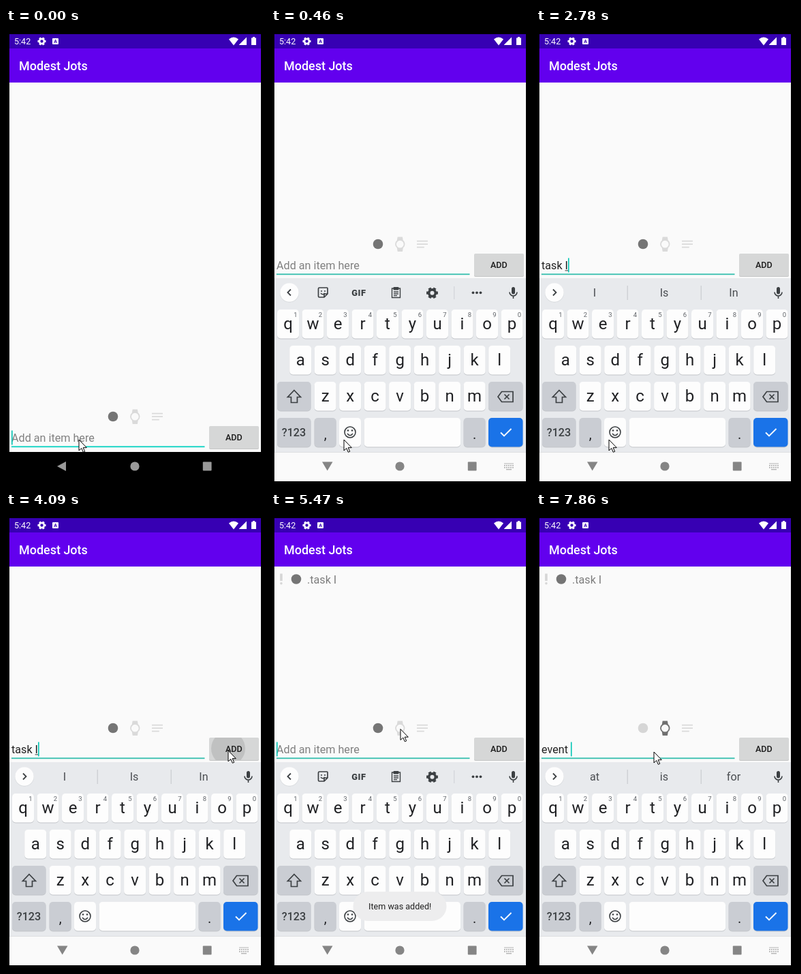
Write an HTML page that moves like this. It is 380 by 669 pixels and loops after 7.99 s.

```html
<!DOCTYPE html>
<html lang="en">
<head>
<meta charset="utf-8">
<title>Modest Jots</title>
<style>
html, body { margin: 0; width: 100%; height: 100%; overflow: hidden; background: #000; }
svg { display: block; width: 380px; height: 669px; }
text { font-family: Roboto, Arial, sans-serif; white-space: pre; }
</style>
</head>
<body>
<svg id="stage" viewBox="0 0 380 669"></svg>
<script>
const LOOP = 7990, FIELD = 16.16, KEYBOARD_SHIFT = 253;

// SVG helpers
const el = (tag, attrs, inner = '') =>
  `<${tag} ${Object.entries(attrs).map(([k, v]) => `${k}="${v}"`).join(' ')}>${inner}</${tag}>`;
const rect = (x, y, width, height, fill, rx = 0) => el('rect', { x, y, width, height, fill, rx });
const dot = (cx, cy, r, fill) => el('circle', { cx, cy, r, fill });
const fillPath = (d, fill, more) => el('path', { d, fill, ...more });
const line = (d, stroke, w = 1.7, more) => el('path', { d, fill: 'none', stroke, 'stroke-width': w, ...more });
const text = (str, x, y, size, fill, more) => el('text', { x, y, 'font-size': size, fill, ...more }, str);
const mid = { 'text-anchor': 'middle' }, bold = { 'font-weight': 500 };
const group = (id, inner, more) => el('g', { id, ...more }, inner);

function gear(x, y, r, color) {
  const ring = (rad, w, more) => el('circle', { cx: x, cy: y, r: rad, fill: 'none', stroke: color, 'stroke-width': w, ...more });
  return ring(r * .58, r * .44) + ring(r * .86, r * .3, { pathLength: 12, 'stroke-dasharray': '1.1 .9', 'stroke-dashoffset': .55 });
}

function statusBar() {
  return rect(5, 9, 369, 21, '#3700b3') + rect(5, 30, 369, 50, '#6200ee') +
    text('5:42', 12, 24, 12.57, '#fff') + gear(52.5, 19.5, 6, '#fff') +
    rect(68, 15, 9, 9, '#fff', 1) + text('A', 72.5, 22.2, 7, '#3700b3', { ...mid, 'font-weight': 700 }) +
    fillPath('M334 25.5L327 16.6Q334 10.5 341 16.6Z', '#fff') +
    fillPath('M342 25V24.6L353 13.5V25Z', '#fff') +
    fillPath('M360 14.5H362V13H365V14.5H367V25H360Z', '#fff') +
    text('Modest Jots', 19, 62, 17.96, '#fff', bold);
}

function inputArea() {
  const watch = 'M20 12c0-2.54-1.19-4.81-3.04-6.27L16 0H8l-.95 5.73a8 8 0 0 0 0 12.54L8 24h8l.96-5.73A8 8 0 0 0 20 12zM6 12a6 6 0 0 1 12 0a6 6 0 0 1-12 0z';
  return el('circle', { id: 'taskIcon', cx: 157, cy: 317, r: 7.3 }) +
    el('path', { id: 'watchIcon', d: watch, transform: 'translate(178.5 306.4) scale(.9)', 'fill-rule': 'evenodd' }) +
    fillPath('M214 311.8h16v1.8h-16zm0 4.5h16v1.8h-16zm0 4.5h10.8v1.8h-10.8z', '#dadada') +
    rect(298, 332, 73, 33, '#c4c5c5', 2) + rect(298, 331, 73, 33, '#d6d7d7', 2) +
    el('clipPath', { id: 'btn' }, rect(298, 331, 73, 33, '#000', 2)) +
    el('circle', { id: 'ripple', cx: 326, cy: 347, fill: '#000', 'clip-path': 'url(#btn)' }) +
    text('ADD', 334.3, 351.9, 12.57, '#1d1d1d', { ...mid, ...bold }) +
    el('rect', { id: 'fieldLine', x: 8, y: 360.4, width: 283.5, height: 1.8 }) +
    text('', 8, 354, FIELD, '#222', { id: 'field' }) +
    el('rect', { id: 'under', y: 355.4, height: 1, fill: '#333' }) +
    el('rect', { id: 'caret', y: 337.5, width: 1.7, height: 21, fill: '#10c8b8' });
}

function keyboard() {
  const ink = '#3c4043', grey = '#cacdd3';
  const key = (x, y, w, fill = '#fdfdfd') => rect(x, y + 1, w, 42.5, '#c3c6ca', 5) + rect(x, y, w, 42.5, fill, 5);
  let out = rect(5, 367, 369, 255, '#e8eaed');
  [['qwertyuiop', 9], ['asdfghjkl', 27.2], ['zxcvbnm', 63.6]].forEach(([row, x0], r) =>
    [...row].forEach((ch, i) => {
      const x = x0 + i * 36.5, y = 413 + r * 53;
      out += key(x, y, 32) + text(ch, x + 16, y + 29, 24, '#202124', mid);
      if (!r) out += text((i + 1) % 10, x + 27, y + 11, 9.5, '#5f6368', mid);
    }));
  out += key(9, 519, 49.5, grey) + key(319, 519, 50.5, grey) + key(9, 572, 49.5, grey) +
    key(63.6, 572, 32, grey) + key(100, 572, 32) + key(136.6, 572, 141.5) +
    key(282.6, 572, 32, grey) + key(319, 572, 50.5, '#1a73e8') +
    text('?123', 33.5, 599, 16.2, ink, { ...mid, ...bold }) +
    text(',', 79.6, 603, 20, '#202124', mid) + text('.', 298.6, 603, 20, '#202124', mid) +
    line('M34 531.5L43.5 541.5H38.5V549.5H29.5V541.5H24.5Z', ink) +
    line('M338.5 533.5H355V548.5H338.5L333 541ZM342.5 537.5l7 7m0-7l-7 7', ink) +
    el('circle', { cx: 116, cy: 593, r: 8, fill: 'none', stroke: ink, 'stroke-width': 1.6 }) +
    dot(113, 590.5, 1.3, ink) + dot(119, 590.5, 1.3, ink) + line('M112 595Q116 600.5 120 595', ink, 1.5) +
    line('M337 593.5L342 598.5L352.5 588', '#fff', 1.9);

  // strip above the keys
  out += dot(27, 388.7, 14, '#d5d8db') + dot(27, 388, 13.7, '#fdfdfd') +
    el('path', { id: 'chevron', fill: 'none', stroke: ink, 'stroke-width': 1.8 }) +
    rect(353, 380, 5, 10.5, ink, 2.5) + line('M350 387.5A5.5 5.5 0 0 0 361 387.5M355.5 393V397', ink, 1.6);
  out += group('tools',
    line('M71 381H82Q83 381 83 382V390L78 395H71Q69.5 395 69.5 393.5V382.5Q69.5 381 71 381ZM83 390H78V395', ink) +
    dot(74, 386, 1, ink) + dot(79, 386, 1, ink) + line('M73 389Q76 392.5 79 389', ink, 1.4) +
    text('GIF', 129, 392.6, 12.8, ink, { ...mid, 'font-weight': 800, 'letter-spacing': .6 }) +
    line('M177.5 382H189.5V395.5H177.5ZM180 387.3H187M180 390H187M180 392.6H185', ink, 1.4) +
    rect(179.5, 380, 8, 4.5, ink, 1) + gear(236.5, 388.7, 8.4, ink) +
    rect(268.3, 379, 1, 19, '#cdd0d4') +
    [296.5, 302, 307.5].map(x => dot(x, 388.3, 1.9, ink)).join(''));
  out += group('words', rect(133.7, 378, 1, 21, '#c4c7cb') + rect(241.7, 378, 1, 21, '#c4c7cb') +
    [86, 188, 290].map(x => text('', x, 394.3, 16.16, '#4a4d51', { ...mid, class: 'word' })).join(''));
  return out;
}

const navIcons = color => dot(189, 643, 6.6, color) + rect(288.8, 636.6, 12.8, 12.8, color, 1);

function lightNav() {
  let keys = rect(342, 638.5, 14, 1.2, '#c0c0c0');
  for (let i = 0; i < 10; i++) keys += rect(342 + i % 5 * 3, 641 + (i / 5 | 0) * 3, 1.8, 1.8, '#b4b4b4');
  return rect(5, 622, 369, 43, '#fafafa') + rect(5, 622, 369, 1, '#dfe0e2') +
    fillPath('M75 636.5H90.5L82.7 649.5Z', '#858585') + navIcons('#858585') +
    keys + rect(345, 647, 8, 1.4, '#b4b4b4');
}

const darkNav = () => fillPath('M88 636V650L75 643Z', '#999') + navIcons('#999');

const listItem = () => rect(13.2, 90.5, 3.6, 10.6, '#d6d6d6') + dot(15, 104.8, 1.8, '#d6d6d6') +
  dot(37, 98.5, 7.3, '#757575') + text('.task I', 53, 104.5, FIELD, '#7d7d7d');

document.getElementById('stage').innerHTML = rect(0, 0, 380, 669, '#000') +
  group('phone',
    rect(5, 80, 369, 542, '#fafafa') + statusBar() + group('item', listItem()) +
    group('input', inputArea()) + group('open', keyboard() + lightNav()) + group('closed', darkNav()) +
    group('toast', rect(120.5, 557, 137, 43, '#ededee', 21.5) + text('Item was added!', 189.2, 583.3, 12.57, '#222', mid))) +
  group('mouse', fillPath('M.5 .5V16.5L4.3 13L6.8 18.8L9.2 17.8L6.7 12.2H11.8Z', '#fff', { stroke: '#000', 'stroke-width': 1 }));

const $ = id => document.getElementById(id);
const words = [...document.querySelectorAll('.word')];
const pen = document.createElement('canvas').getContext('2d');
pen.font = `${FIELD}px Roboto, Arial, sans-serif`;
const widthOf = s => pen.measureText(s).width;

// time, typed text, underlined slice, suggestions
const typing = [
  [0, '', 0, 0, ''],
  [1360, 't', 0, 0, ''],
  [1500, 'ta', 0, 1, 't to the'],
  [1650, 'tas', 0, 2, 'ta take talk'],
  [1790, 'task', 0, 3, 'tas task taste'],
  [1940, 'task ', 0, 4, 'task tasks taste'],
  [2230, 'task ', 0, 0, 'is and for'],
  [2510, 'task I', 0, 0, 'is and for'],
  [2780, 'task I', 5, 6, 'I Is In'],
  [4370, '', 0, 0, ''],
  [7110, 'e', 0, 0, ''],
  [7260, 'ev', 0, 1, 'e even every'],
  [7410, 'eve', 0, 2, 'ev even every'],
  [7560, 'even', 0, 3, 'eve even every'],
  [7710, 'event', 0, 4, 'even event events'],
  [7860, 'event ', 0, 0, 'at is for']
];
const caretHidden = [[150, 910], [3240, 3740], [5070, 5340], [5870, 6400], [6800, 7110]];
const mousePath = [[0, 106.5, 603.5], [3100, 106.5, 603.5], [3940, 325.5, 349.5], [4930, 325.5, 349.5],
  [5340, 189.5, 318], [5600, 189.5, 318], [6010, 176, 364], [6400, 172.5, 351.5], [LOOP, 172.5, 351.5]];
const toastFade = [[0, 0], [4500, .5], [4640, 1], [6260, .6], [6400, .3], [6530, 0]];
const rippleSteps = [[0, 0, 0], [4090, 25, .1], [4220, 48, .1], [4370, 60, .05], [4500, 0, 0]];

const at = (list, t) => list.findLast(s => s[0] <= t);
const show = (id, on) => $(id).setAttribute('display', on ? 'inline' : 'none');
const set = (id, attrs) => Object.entries(attrs).forEach(([k, v]) => $(id).setAttribute(k, v));

function mouseAt(t) {
  const s = Math.floor((t - 20) / 136) * 136 + 20;
  const i = Math.max(1, mousePath.findIndex(p => p[0] > s));
  const [a, x, y] = mousePath[i - 1], [b, x2, y2] = mousePath[i];
  const u = Math.max(0, (s - a) / (b - a)), e = u * u * (3 - 2 * u);
  return [x + (x2 - x) * e, y + (y2 - y) * e];
}

function draw(t) {
  const open = t >= 460, watchOn = t >= 5600;
  show('phone', t < 300 || open);
  show('open', open);
  show('closed', !open);
  show('item', t >= 4370);
  set('input', { transform: `translate(0 ${open ? 0 : KEYBOARD_SHIFT})` });
  set('fieldLine', { fill: open ? '#35bfae' : '#08d2c2' });
  set('taskIcon', { fill: watchOn ? '#d6d6d6' : '#757575' });
  set('watchIcon', { fill: watchOn ? '#707070' : '#dadada' });

  const [, typed, from, to, hints] = at(typing, t);
  $('field').textContent = typed || 'Add an item here';
  set('field', { fill: typed ? '#222' : '#808080' });
  const left = widthOf(typed.slice(0, from));
  set('under', { x: 8 + left, width: widthOf(typed.slice(0, to)) - left });
  set('caret', { x: 8 + widthOf(typed) });
  show('caret', !caretHidden.some(([a, b]) => t >= a && t < b));

  show('tools', !hints);
  show('words', hints);
  hints.split(' ').forEach((w, i) => words[i].textContent = w);
  set('chevron', { d: hints ? 'M25 383.5L29.5 388L25 392.5' : 'M29 383.5L24.5 388L29 392.5' });

  const [, r, opacity] = at(rippleSteps, t);
  set('ripple', { r, opacity });
  set('toast', { opacity: at(toastFade, t)[1] });
  set('mouse', { transform: `translate(${mouseAt(t)})` });
}

function frame() {
  draw(performance.now() % LOOP);
  requestAnimationFrame(frame);
}
frame();
</script>
</body>
</html>
```
